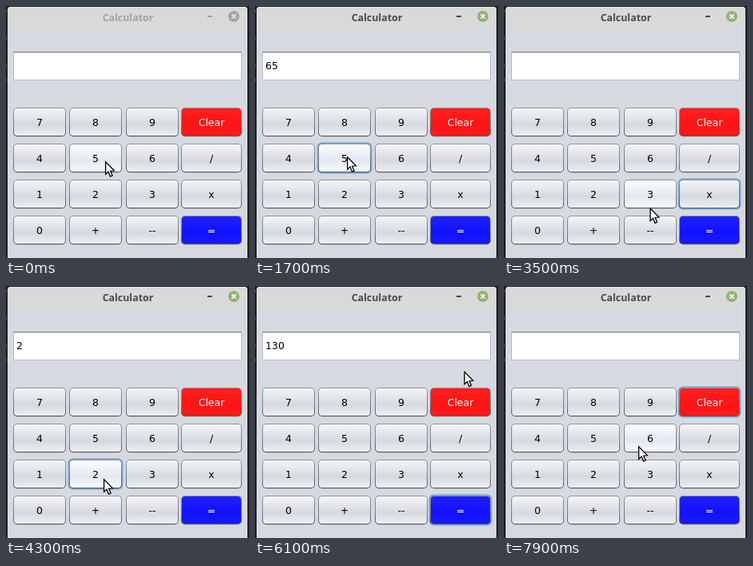
An HTML page with a canvas for the animation above (8 s loop, 304 by 315 pixels).

```html
<!DOCTYPE html>
<html lang="en">
<head>
<meta charset="utf-8">
<title>Calculator</title>
<style>
html, body { margin: 0; width: 100%; height: 100%; overflow: hidden; background: #1d1d1f; }
canvas { display: block; width: 304px; height: 315px; }
</style>
</head>
<body>
<canvas id="stage"></canvas>
<script>
const W = 304, H = 315, LOOP = 8000, STEP = 100;
const canvas = document.getElementById('stage');
const ctx = canvas.getContext('2d');
const ratio = window.devicePixelRatio || 1;
canvas.width = W * ratio;
canvas.height = H * ratio;

const LABEL_FONT = '12.5px "DejaVu Sans", sans-serif';
const TITLE_FONT = 'bold 12.4px "Noto Sans", sans-serif';
const COLS = [[9, 66], [79, 66], [150, 66], [219, 76]];
const ROWS = [['7', '8', '9', 'Clear'], ['4', '5', '6', '/'], ['1', '2', '3', 'x'], ['0', '+', '--', '=']];
const TINTS = {
  Clear: { up: ['#ff2020', '#ff1414', '#ff1a1a'], down: ['#c01018', '#b40c14', '#cc1c22'] },
  '=': { up: ['#2020ff', '#1212ff', '#1818ff'], down: ['#1010bc', '#0808b0', '#1c1cc8'] }
};
const FILLS = {
  up: ['#f4f5f7', '#d6d9df', '#eceef2'],
  hover: ['#fbfcfd', '#e3e8f1', '#f8fafd'],
  down: ['#b4bac4', '#a0a8b4', '#c1c8d2']
};

const buttons = ROWS.flatMap((row, r) => row.map((label, c) => (
  { label, x: COLS[c][0], y: 127 + 45 * r, w: COLS[c][1], h: 36 }
)));

// Pointer legs: begin, end, target, optional vertical bend
const START = { x: 124, y: 194 };
const LEGS = [
  { from: 100, to: 400, x: 178, y: 193 },
  { from: 1000, to: 1300, x: 115, y: 188 },
  { from: 1800, to: 2400, x: 267, y: 240 },
  { from: 3000, to: 3900, x: 122, y: 241, bend: 24 },
  { from: 4300, to: 4900, x: 248, y: 274 },
  { from: 5600, to: 6000, x: 262, y: 99 },
  { from: 6000, to: 6300, x: 260, y: 128 },
  { from: 7300, to: 7700, x: 160, y: 206 },
  { from: 7800, to: 7900, x: 168, y: 200 }
];

// Clicks: press, focus ring, release and the text shown afterwards
const CLICKS = [
  { label: '6', down: 700, ring: 800, up: 900, text: '6' },
  { label: '5', down: 1500, ring: 1600, up: 1700, text: '65' },
  { label: 'x', down: 2600, ring: 2800, up: 2900, text: '' },
  { label: '2', down: 4100, ring: 4100, up: 4300, text: '2' },
  { label: '=', down: 5100, ring: 5200, up: 5300, text: '130' },
  { label: 'Clear', down: 6700, ring: 6700, up: 6800, text: '' }
];

const ease = p => p * p * (3 - 2 * p);

function pointerAt(t) {
  let { x, y } = START;
  for (const leg of LEGS) {
    if (t < leg.from) break;
    const p = ease(Math.min(1, (t - leg.from) / (leg.to - leg.from)));
    x += (leg.x - x) * p;
    y += (leg.y - y) * p + 2 * p * (1 - p) * (leg.bend || 0);
  }
  return { x, y };
}

function stateAt(t) {
  const state = { text: '', focus: null, pressed: null, active: t >= CLICKS[0].down };
  for (const click of CLICKS) {
    if (t >= click.down) state.focus = t >= click.ring ? click.label : null;
    if (t >= click.down && t < click.up) state.pressed = click.label;
    if (t >= click.up) state.text = click.text;
  }
  return state;
}

function rounded(x, y, w, h, r, fill) {
  ctx.beginPath();
  ctx.roundRect(x, y, w, h, r);
  ctx.fillStyle = fill;
  ctx.fill();
}

function rect(x, y, w, h, fill) {
  ctx.fillStyle = fill;
  ctx.fillRect(x, y, w, h);
}

function shade(y, h, colors) {
  const g = ctx.createLinearGradient(0, y, 0, y + h);
  [0, 0.6, 1].forEach((stop, i) => g.addColorStop(stop, colors[i]));
  return g;
}

function label(text, x, y, font, color, align) {
  ctx.font = font;
  ctx.fillStyle = color;
  ctx.textAlign = align;
  ctx.fillText(text, x, y);
}

function drawWindow(active) {
  rect(0, 0, W, H, '#1d1d1f');
  for (const y of [5, 39, 73, 91]) rect(0, y, 1, 3, '#55575a');
  rounded(2, 1, 300, 330, [4, 4, 0, 0], '#d6d9df');
  rounded(2, 1, 300, 27, [4, 4, 0, 0], '#d9d9d9');
  rect(5, 1, 294, 1, '#e6e6e6');
  label('Calculator', 152.5, 19, TITLE_FONT, active ? '#4a4a4a' : '#a3a3a3', 'center');
  rect(252, 12, 6, 2, active ? '#484848' : '#a3a3a3');

  ctx.beginPath();
  ctx.arc(285, 13, 7, 0, Math.PI * 2);
  ctx.fillStyle = active ? '#92b372' : '#a5a5a5';
  ctx.fill();
  ctx.beginPath();
  ctx.moveTo(282.4, 10.4);
  ctx.lineTo(287.6, 15.6);
  ctx.moveTo(287.6, 10.4);
  ctx.lineTo(282.4, 15.6);
  ctx.strokeStyle = active ? '#fff' : '#e6e6e6';
  ctx.lineWidth = 1.6;
  ctx.stroke();
}

function drawField(text) {
  rect(9, 57, 286, 36, '#b9bcc1');
  rect(9, 57, 286, 1, '#85878b');
  rect(10, 58, 284, 34, '#fff');
  rect(10, 58, 284, 1, '#d9dadc');
  rect(10, 59, 284, 1, '#f3f3f4');
  label(text, 13, 79, LABEL_FONT, '#000', 'left');
}

function drawButton(b, state, hovered) {
  const { x, y, w, h } = b;
  const pressed = state.pressed === b.label;
  const tint = TINTS[b.label];
  let fill = pressed ? FILLS.down : hovered ? FILLS.hover : FILLS.up;
  if (tint) fill = pressed ? tint.down : tint.up;

  if (state.focus === b.label) rounded(x - 1.4, y - 1.4, w + 2.8, h + 2.8, 6, '#73a4d1');
  else rounded(x + 0.5, y + 1, w - 1, h, 5, '#bfc3ca');
  rounded(x, y, w, h, 5, shade(y, h, pressed ? ['#3b434e', '#38404b', '#353c46'] : ['#92959b', '#777b82', '#53575e']));
  rounded(x + 1, y + 1, w - 2, h - 2, 4, shade(y + 1, h - 2, fill));
  label(b.label, x + w / 2, y + 23, LABEL_FONT, tint ? '#fff' : '#000', 'center');
}

function drawPointer({ x, y }) {
  const tip = [[0.6, 0.8], [0.6, 16.2], [4, 13.1], [6.5, 19.1], [9.1, 18], [6.6, 12.2], [11.4, 11.8]];
  ctx.save();
  ctx.translate(x, y);
  ctx.beginPath();
  tip.forEach(p => ctx.lineTo(...p));
  ctx.closePath();
  ctx.fillStyle = '#fff';
  ctx.fill();
  ctx.strokeStyle = '#000';
  ctx.lineWidth = 1.3;
  ctx.stroke();
  ctx.restore();
}

function draw(time) {
  const t = Math.floor((time % LOOP) / STEP) * STEP;
  const state = stateAt(t);
  const pointer = pointerAt(t);
  const over = b => pointer.x >= b.x && pointer.x < b.x + b.w && pointer.y >= b.y && pointer.y < b.y + b.h;

  ctx.setTransform(ratio, 0, 0, ratio, 0, 0);
  drawWindow(state.active);
  drawField(state.text);
  for (const b of buttons) drawButton(b, state, over(b));
  drawPointer(pointer);
}

const begin = performance.now();
function tick() {
  draw(performance.now() - begin);
  requestAnimationFrame(tick);
}
tick();
</script>
</body>
</html>
```
